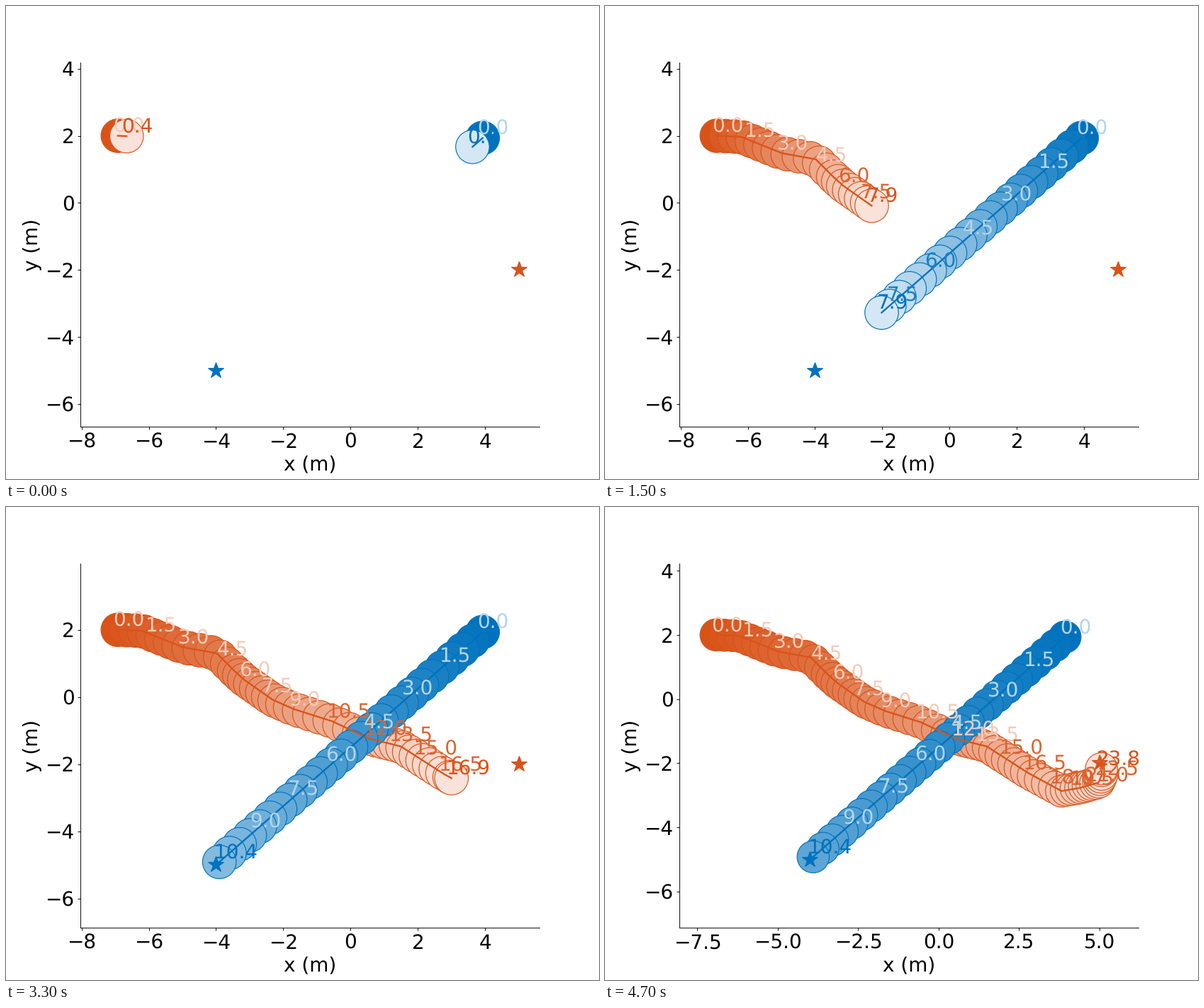
A matplotlib script for the animation above (5700 ms loop, 837x669 px).

```python
import numpy as np
import matplotlib.pyplot as plt
from matplotlib.animation import FuncAnimation

W, H, DPI = 837, 669, 64
K = 83.65 / DPI  # point sizes are laid out for a figure about 10 inches wide

plt.rcParams.update({
    "font.family": "DejaVu Sans",
    "font.size": 24 * K,
    "text.hinting": "none",
    "axes.linewidth": 0.8 * K,
    "axes.labelpad": 4 * K,
    "axes.spines.top": False,
    "axes.spines.right": False,
})
for axis in ("xtick", "ytick"):
    plt.rcParams.update({
        axis + ".major.size": 3.5 * K,
        axis + ".major.width": 0.8 * K,
        axis + ".major.pad": 3.5 * K,
    })

DT = 0.1
RADIUS = 0.5
INTERVAL, FRAMES = 100, 57
END = 238  # last time step
DISC_STEP, LABEL_STEP = 4, 15

# (time, x, y) where the winding route changes heading or speed
TURNS = [
    (0, -6.92, 2.0), (1.1, -6.2, 1.97), (3, -4.98, 1.48), (4.2, -3.98, 1.3),
    (5.2, -3.46, 0.78), (6, -3.16, 0.51), (7.9, -2.316, -0.085),
    (9, -1.68, -0.365), (10.5, -0.545, -0.725), (12, 0.54, -1.235),
    (13.9, 1.497, -1.475), (16.5, 2.78, -2.3), (18.4, 3.82, -2.865),
    (19.9, 4.39, -2.766), (21.9, 4.966, -2.6), (23.1, 5.07, -2.37),
    (23.8, 5.06, -2.17),
]


def winding_path():
    times, xs, ys = zip(*TURNS)
    t = np.arange(END + 1) * DT
    return np.column_stack([np.interp(t, times, xs), np.interp(t, times, ys)])


def straight_path(start, goal, steps):
    """Unit speed from start towards goal."""
    start, goal = np.array(start, float), np.array(goal, float)
    heading = (goal - start) / np.hypot(*(goal - start))
    return start + np.outer((np.arange(steps + 1) + 1) * DT, heading)


AGENTS = [
    (winding_path(), (5, -2), np.array([0.85, 0.325, 0.098])),
    (straight_path((4, 2), (-4, -5), 104), (-4, -5), np.array([0.0, 0.447, 0.741])),
]

fig = plt.figure(figsize=(W / DPI, H / DPI), dpi=DPI, facecolor="white")
ax = fig.add_axes([0.125, 0.11, 0.775, 0.77])


def tint(color, alpha):
    return tuple(1 - alpha * (1 - color))


def draw_agent(path, goal, color, now):
    last = min(now, len(path) - 1)
    edge = tuple(color)

    def age(i):
        return i / (1.2 * now)

    def disc(i):
        ax.add_patch(plt.Circle(path[i], RADIUS, fc=tint(color, 1 - age(i)), ec=edge, lw=K))

    def stamp(i, shade):
        ax.text(path[i, 0] - 0.15, path[i, 1] + 0.1, f"{i * DT:.1f}", color=shade)

    ax.plot(*path[:last + 1].T, color=edge, lw=2 * K)
    ax.plot(*goal, color=edge, marker="*", markersize=20 * K, markeredgewidth=K)
    for i in range(0, last, DISC_STEP):
        disc(i)
    for i in range(0, last, LABEL_STEP):
        stamp(i, tint(color, 0.3 if age(i) < 0.5 else 0.9))
    disc(last)
    stamp(last, edge)


def draw(frame):
    now = min(4 + 5 * frame, END)
    ax.clear()
    for path, goal, color in AGENTS:
        draw_agent(path, goal, color, now)
    ax.set_xlabel("x (m)")
    ax.set_ylabel("y (m)")
    ax.axis("equal")
    return []


anim = FuncAnimation(fig, draw, frames=FRAMES, interval=INTERVAL,
                     repeat=True, repeat_delay=0, blit=False)
plt.show()
```
